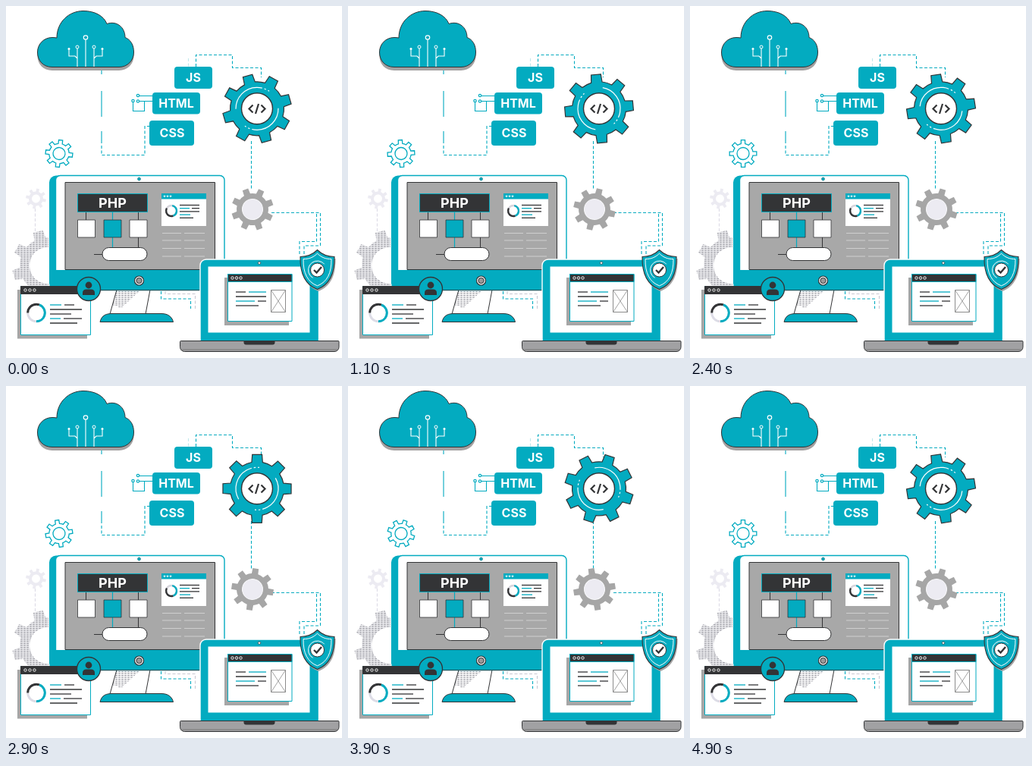
An HTML page with a canvas for the animation above (5 s loop, 443 by 464 pixels).

```html
<!DOCTYPE html>
<html lang="en">
<head>
<meta charset="utf-8">
<title>Web development</title>
<style>
html, body { margin: 0; width: 100%; height: 100%; overflow: hidden; background: #fff; }
canvas { display: block; width: 443px; height: 464px; }
</style>
</head>
<body>
<canvas id="stage" width="443" height="464"></canvas>
<script>
const W = 443, H = 464, LOOP = 5000, STEP = 100;
const TEAL = '#03abc0', DARK = '#333436', GREY = '#a6a6a6', PALE = '#ecebf2', WHITE = '#fff';
const stage = document.getElementById('stage').getContext('2d');
const still = document.createElement('canvas');
still.width = W;
still.height = H;
let c = still.getContext('2d');

const rad = deg => deg * Math.PI / 180;

function paint(fill, stroke, width = 1) {
  if (fill) { c.fillStyle = fill; c.fill(); }
  if (stroke) { c.strokeStyle = stroke; c.lineWidth = width; c.stroke(); }
}

function box(x, y, w, h, fill, stroke, r = 0, width = 1) {
  c.beginPath();
  c.roundRect(x, y, w, h, r);
  paint(fill, stroke, width);
}

function disc(x, y, r, fill, stroke, width) {
  c.beginPath();
  c.arc(x, y, r, 0, Math.PI * 2);
  paint(fill, stroke, width);
}

function arc(x, y, r, from, to, color, width) {
  c.beginPath();
  c.arc(x, y, r, rad(from), rad(to));
  paint(null, color, width);
}

function shape(d, fill, stroke, width = 1) {
  const p = new Path2D(d);
  if (fill) { c.fillStyle = fill; c.fill(p); }
  if (stroke) { c.strokeStyle = stroke; c.lineWidth = width; c.stroke(p); }
}

function dashed(d, color = TEAL) {
  c.setLineDash([4, 2.5]);
  shape(d, null, color, 1.1);
  c.setLineDash([]);
}

function label(text, x, y, size, color = WHITE) {
  c.font = `700 ${size}px Inter, "Open Sans", sans-serif`;
  c.textAlign = 'center';
  c.textBaseline = 'alphabetic';
  c.fillStyle = color;
  c.fillText(text, x, y);
}

function gearPath(outer, inner, teeth = 8) {
  const pitch = Math.PI * 2 / teeth;
  c.beginPath();
  for (let i = 0; i < teeth; i++) {
    const a = i * pitch;
    for (const [r, k] of [[inner, -0.26], [outer, -0.18], [outer, 0.18], [inner, 0.26]]) {
      c.lineTo(r * Math.cos(a + k * pitch), r * Math.sin(a + k * pitch));
    }
    c.arc(0, 0, inner, a + 0.26 * pitch, a + 0.74 * pitch);
  }
  c.closePath();
}

function at(x, y, turn, draw) {
  c.save();
  c.translate(x, y);
  c.rotate(turn);
  draw();
  c.restore();
}

// Fine rows of dots over the current clip area
function halftone(x, y, w, h) {
  c.fillStyle = '#a3a3aa';
  for (let j = 0; j < h; j += 2.5) {
    for (let i = 0; i < w; i += 4) c.fillRect(x + i, y + j, 3, 1.2);
  }
}

function dots(x, y, gap, r) {
  for (let i = 0; i < 3; i++) disc(x + i * gap, y, r, null, WHITE, 1);
}

function rows(y, gap, list) {
  list.forEach(([a, b, color, d, e], i) => {
    const yy = y + i * gap;
    shape(`M${a} ${yy}H${b}`, null, color, 1.3);
    if (d) shape(`M${d} ${yy}H${e}`, null, color === TEAL ? DARK : TEAL, 1.3);
  });
}

function cloud() {
  const d = 'M61 80.5C49 80.5 41.5 72 41.5 61C41.5 50 50 41.5 61 41.5Q64 41.5 67 42' +
    'C67 21 83 6.5 102 6.5C117 6.5 129 13 133 23.5C146 19 157 28 157 41.5' +
    'C164 44 168.5 51 168.5 61C168.5 72 160 80.5 149 80.5Z';
  at(0, 4.5, 0, () => shape(d, '#a3a1a1'));
  shape(d, TEAL, DARK, 1);
  shape('M105 44V80M94 56V80M116 56V80M83 58V66H91L94 69M127 58V66H119L116 69', null, WHITE, 1.1);
  disc(105, 41.5, 2.7, TEAL, WHITE, 1.2);
  for (const x of [94, 116]) disc(x, 54, 2, TEAL, WHITE, 1);
  for (const x of [83, 127]) disc(x, 56.5, 1.5, WHITE);
}

function links() {
  shape('M126 85V90M126 112V146M126 165V181', null, TEAL, 1.1);
  dashed('M126 184V196.5H183V158.5H190');
  dashed('M250.500 80V64.500H298.500V81.500H336.500V94');
  dashed('M240.500 69V80', '#bfe7ec');
  dashed('M323.500 178V242');
  dashed('M350 272.500H414.500V316H393V328');
  dashed('M409.500 274V310.500H387V328');
  dashed('M204.500 376V386H243.500V399');
  dashed('M210 376V379.500H249.500V399', '#c9c8d2');
  dashed('M38.500 267V302', '#dcdbe5');
  shape('M176 118.500H194M175 125.500H194M167.500 127V138.500H182.500V126', null, TEAL, 1.1);
  for (const [x, y] of [[174, 118], [167.5, 125], [174, 125.5]]) disc(x, y, 1.7, WHITE, TEAL, 1.2);
}

function tags() {
  box(222, 80, 50, 29, TEAL, null, 4);
  box(193, 114, 63, 28.5, TEAL, null, 4);
  box(189, 151, 59, 33, TEAL, null, 4);
  label('JS', 247, 99.5, 16);
  label('HTML', 224.5, 133.5, 16);
  label('CSS', 219, 173, 16);
}

function backGears() {
  at(39.5, 254, 0.2, () => {
    gearPath(13.5, 9.5);
    paint(PALE);
    disc(0, 0, 5.5, WHITE);
  });
  at(55, 342, -0.28, () => {
    c.save();
    gearPath(47, 37);
    c.moveTo(24, 0);
    c.arc(0, 0, 24, 0, Math.PI * 2, true);
    c.clip('evenodd');
    c.rotate(0.28);
    c.fillStyle = '#efeff2';
    c.fillRect(-50, -50, 100, 100);
    halftone(-48, -48, 96, 96);
    c.restore();
  });
  box(56, 296, 60, 80, WHITE);
}

function stand() {
  const neck = 'M146 374L137 406H184L190 374Z';
  shape(neck, WHITE);
  c.save();
  c.clip(new Path2D('M146 374L140 394L152 398L178 374Z'));
  halftone(136, 376, 56, 24);
  c.restore();
  shape(neck, null, DARK);
  shape('M124 416.500C126 407 133 405.500 140 405.500H205C214 405.500 219 410 220.500 416.500Z', TEAL, DARK);
}

function monitor() {
  stand();
  box(57, 223.5, 110, 151, TEAL, null, 9);
  box(65.5, 223.5, 222.5, 151, WHITE, TEAL, 6, 1.4);
  box(65, 348, 223.5, 26.5, TEAL, null, [0, 0, 6, 6]);
  shape('M66 374.500H284', null, DARK, 0.8);
  box(78, 232.5, 197.5, 115, '#a8a8a8', DARK);
  disc(175.5, 228, 2, TEAL, '#267985', 0.7);
  disc(175.5, 362, 6, WHITE, DARK, 1.2);
  disc(175.5, 362, 3.7, '#999', DARK, 1);

  shape('M105.500 272V282M174.500 272V282M174.500 305V318M116 327.500H127', null, DARK, 1);
  shape('M140.500 272V282M140.500 305V318', null, TEAL, 1.2);
  box(94.5, 247.5, 92, 24, DARK, TEAL);
  label('PHP', 140.5, 265.5, 18);
  box(94.5, 282, 23, 23, WHITE, DARK, 0, 0.8);
  box(129, 282, 23, 23, TEAL, DARK, 0, 0.8);
  box(163, 282, 23, 23, WHITE, DARK, 0, 0.8);
  box(127, 318.5, 59, 17, WHITE, DARK, 8.5);

  box(205, 247, 59, 43, WHITE);
  box(205, 247, 59, 7.5, TEAL);
  dots(209, 250.7, 4, 0.9);
  arc(218, 270, 7, 0, 360, '#d7d6dd', 2.4);
  arc(218, 270, 7, -80, 70, TEAL, 2.4);
  arc(218, 270, 7, 70, 210, DARK, 2.4);
  rows(262.5, 4.2, [[229, 255, DARK], [229, 242, TEAL, 245, 255], [229, 255, DARK],
    [229, 243, TEAL], [229, 247, DARK]]);
  for (const y of [299.5, 309, 319.5, 330]) {
    shape(`M206 ${y}H231M235 ${y}H262`, null, '#cfcfcf', 1);
  }
}

function leftWindow() {
  box(15, 374, 92, 64.5, GREY);
  box(19.5, 369.5, 92, 64, WHITE, TEAL);
  box(19.5, 369.5, 92, 10, DARK, DARK);
  dots(25.5, 374.5, 6, 1.7);
  arc(40, 404.5, 11.3, 90, 180, '#dddce6', 3);
  arc(40, 404.5, 11.3, -70, 90, TEAL, 3);
  arc(40, 404.5, 11.3, 180, 290, DARK, 3);
  rows(394, 6, [[58, 73, TEAL, 77, 90], [58, 100, DARK], [58, 86, DARK],
    [58, 72, TEAL, 76, 100], [58, 94, DARK]]);
  disc(109, 373, 15.5, TEAL, DARK, 1.3);
  disc(109, 368, 4.4, DARK);
  shape('M101 381V378Q101 373.500 106 373.500H112Q117 373.500 117 378V381Z', DARK);
}

function laptop() {
  box(256, 334, 156.5, 108, TEAL, WHITE, [8, 8, 0, 0], 1.4);
  box(266.5, 343.5, 134, 87, WHITE);
  disc(334, 338.7, 1.7, WHITE, DARK, 0.7);
  box(229.5, 441.5, 209.5, 14, '#a1a1a3', DARK, [1, 1, 6, 6]);
  shape('M230 453H438', null, '#777', 1);
  box(313.5, 441.5, 41, 5, DARK, null, [0, 0, 3, 3]);
  box(288, 358, 85, 63, GREY);
  box(292.5, 353.5, 84.5, 62, WHITE, TEAL);
  box(292.5, 353.5, 84.5, 10, DARK, TEAL);
  dots(298.5, 358.5, 5.5, 1.7);
  rows(377, 6, [[303, 316, DARK, 320, 343], [303, 343, DARK], [303, 328, TEAL, 332, 343], [303, 333, DARK]]);
  box(349.5, 374.5, 19, 29, WHITE, '#8b8b8b');
  shape('M349.500 374.500L368.500 403.500M368.500 374.500L349.500 403.500', null, '#8b8b8b', 0.8);
}

function shield() {
  const d = 'M0 -26C-7 -19 -14 -17 -22.500 -17C-23 5 -16 20 0 26C16 20 23 5 22.500 -17C14 -17 7 -19 0 -26Z';
  at(412, 350, 0, () => shape(d, GREY));
  at(410.5, 347.5, 0, () => {
    shape(d, TEAL, DARK, 1.1);
    c.scale(0.82, 0.82);
    shape(d, null, WHITE, 1.2);
  });
  arc(410.5, 348, 12, 120, 320, WHITE, 1);
  disc(410.5, 348, 9, WHITE, DARK, 1);
  shape('M406 348L409.500 351.500L416 344', null, DARK, 2.4);
}

// The two small gears turn against the big one
function spinners(turn) {
  at(70, 194.5, rad(7) + turn, () => {
    gearPath(18, 13.2);
    paint(WHITE, TEAL, 1.3);
    disc(0, 0, 8, WHITE, TEAL, 1.3);
  });
  at(325, 268, rad(25) + turn, () => {
    gearPath(28, 21);
    paint(GREY);
    disc(0, 0, 13.5, PALE, '#f8f8fa', 1);
  });
  at(331, 135.3, rad(-16) - turn, () => {
    gearPath(45.5, 35.5);
    paint(TEAL, DARK, 1.2);
    for (const a of [15, 195]) {
      arc(0, 0, 28, a, a + 105, WHITE, 1.2);
      arc(0, 0, 28, a + 111, a + 116, WHITE, 1.2);
      arc(0, 0, 28, a + 122, a + 126, WHITE, 1.2);
    }
  });
  disc(331, 135.3, 20.5, WHITE, DARK, 1.4);
  shape('M325.500 130.500L320.500 135.500L325.500 140.500M336.500 130.500L341.500 135.500L336.500 140.500M333 129L329 142',
    null, DARK, 2.2);
}

function drawStill() {
  c.fillStyle = WHITE;
  c.fillRect(0, 0, W, H);
  links();
  cloud();
  tags();
  backGears();
  monitor();
  leftWindow();
  laptop();
  shield();
}

drawStill();
c = stage;
const start = performance.now();

function frame() {
  const t = (performance.now() - start) % LOOP;
  const step = Math.floor(t / STEP);
  c.drawImage(still, 0, 0);
  spinners(rad(step * 360 * STEP / LOOP));
  requestAnimationFrame(frame);
}
frame();
</script>
</body>
</html>
```
